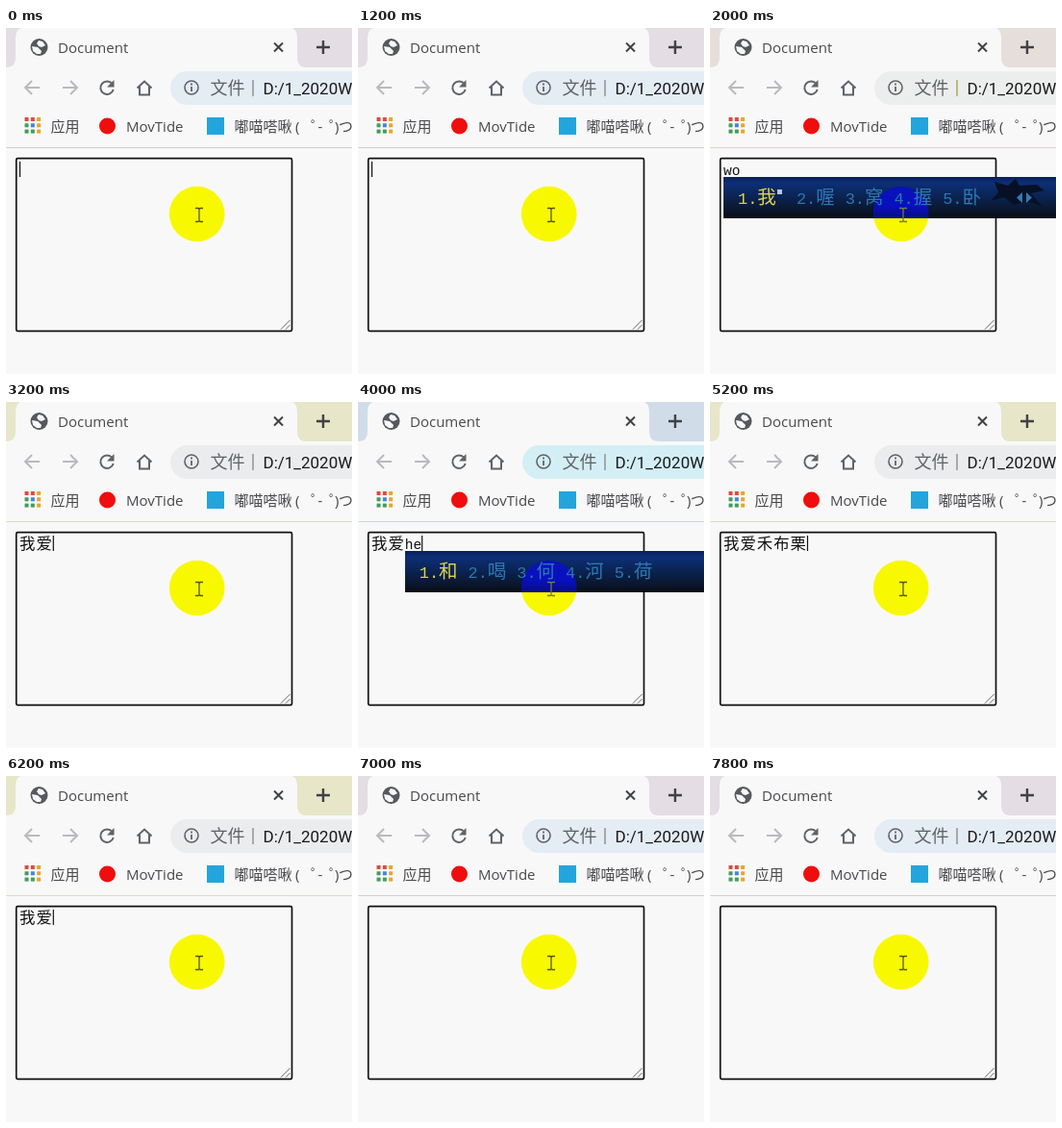
An HTML page for the animation above (8000 ms loop, 360 px wide and 360 px high).

```html
<!DOCTYPE html>
<html lang="zh">
<head>
<meta charset="utf-8">
<title>Document</title>
<style>
  html, body { margin: 0; width: 100%; height: 100%; overflow: hidden; background: #f8f8f8; }
  svg { display: block; width: 100vw; height: 100vh; }
  text { font-family: "Open Sans", "Noto Sans CJK SC", "Noto Sans CJK", sans-serif; font-size: 15px; fill: #48494c; white-space: pre; }
  .line { fill: none; stroke: #5f6368; stroke-width: 2; }
  .han { font-family: "Noto Sans CJK SC", "Noto Sans CJK", sans-serif; font-weight: 300; }
  .mono { font-family: "Liberation Mono", monospace; }
  .address { font-family: Roboto, sans-serif; font-size: 17px; fill: #18191b; }
</style>
</head>
<body>
<svg viewBox="0 0 360 360">
  <defs>
    <linearGradient id="barFill" x2="0" y2="1">
      <stop offset="0" stop-color="#0a1f55"/>
      <stop offset=".14" stop-color="#0c2f78"/>
      <stop offset=".5" stop-color="#0b2350"/>
      <stop offset=".85" stop-color="#0a1428"/>
      <stop offset="1" stop-color="#080c14"/>
    </linearGradient>
    <linearGradient id="glow" gradientUnits="userSpaceOnUse" x1="0" x2="0" y1="165" y2="198">
      <stop offset="0" stop-color="#0a12b8"/>
      <stop offset=".6" stop-color="#0810c0"/>
      <stop offset="1" stop-color="#080c80"/>
    </linearGradient>
    <clipPath id="barClip"><rect id="barClipRect" y="155" width="400" height="43"/></clipPath>
  </defs>
  <rect width="360" height="360" fill="#f8f8f8"/>

  <!-- Tab strip -->
  <rect id="strip" width="360" height="41"/>
  <path d="M0 41Q10 41 10 31V10Q10 -1 21 -1H292Q303 -1 303 10V31Q303 41 313 41Z" fill="#f8f8f8"/>
  <circle cx="34.500" cy="20" r="9" fill="#55585c"/>
  <path d="M27 19l6 1 4 4-1 3-4 0-4-3zM34 13l4 1 3 4-4 2-3-1-2-3z" fill="#f8f8f8"/>
  <text x="54" y="26">Document</text>
  <path class="line" d="M279 15.500l9 9m0-9l-9 9" style="stroke:#3f4144"/>
  <path class="line" d="M330 13v14m-7-7h14" style="stroke:#3f4144;stroke-width:2.4"/>

  <!-- Address row -->
  <path class="line" d="M35 62H20m7-7l-7 7 7 7" style="stroke:#b9babd"/>
  <path class="line" d="M59 62H74m-7-7l7 7-7 7" style="stroke:#b9babd"/>
  <path class="line" d="M110.500 58A6.800 6.800 0 1 0 111.700 64"/>
  <path d="M112.500 54v7.500h-7.500z" fill="#5f6368"/>
  <path class="line" d="M136.500 62.500L144 55.500l7.500 7M139 61v8.500h10V61"/>
  <rect id="pill" x="171" y="45" width="230" height="35" rx="17.500"/>
  <circle class="line" cx="193" cy="62" r="7" style="stroke-width:1.6"/>
  <path class="line" d="M193 61v5m0-8.500v2" style="stroke-width:1.8"/>
  <text x="212.500" y="68.500" style="font-size:18px;fill:#5f6368">文件</text>
  <path id="separator" d="M257 54v17" stroke-width="1.4"/>
  <text class="address" x="267.500" y="68.500">D:/1_2020W</text>

  <!-- Bookmarks -->
  <g id="apps"></g>
  <text x="46.500" y="107.500">应用</text>
  <circle cx="105.500" cy="102" r="8.500" fill="#f00d0d"/>
  <text x="125" y="107.500">MovTide</text>
  <rect x="209" y="93" width="18" height="18" fill="#22a5dc"/>
  <text y="107.500"><tspan x="237.500">嘟喵嗒啾</tspan><tspan x="301">(</tspan><tspan x="317">゜</tspan><tspan x="324.500">-</tspan><tspan x="336">゜</tspan><tspan x="342">)</tspan><tspan x="346">つ</tspan></text>
  <path id="divider" d="M0 124.500H360"/>

  <!-- Text area -->
  <rect x="10.700" y="135.700" width="286.800" height="179.600" rx="1.500" fill="#f8f8f8" stroke="#111" stroke-width="1.700"/>
  <path d="M286 313.500l9.500-9.500m-4.500 9.500l4.500-4.500" stroke="#666"/>
  <circle cx="198.700" cy="193.500" r="28.800" fill="#f8f800"/>
  <text id="typed" x="14" y="152.500" style="fill:#111"></text>
  <path id="caret" stroke="#111" stroke-width="1.200"/>

  <!-- Input method bar -->
  <g id="bar" clip-path="url(#barClip)">
    <rect id="barBody" y="155" width="400" height="43" fill="url(#barFill)"/>
    <circle cx="198.700" cy="193.500" r="28.800" fill="url(#glow)"/>
    <g id="pager">
      <path d="M296 160l14 4 8-7 4 7 18-1 8 6-14 3 12 14-16-6-14 4-10-8-14 4 8-9z" fill="#081026"/>
      <path d="M325 171v11l-6-5.500zM329 171v11l6-5.500z" fill="#2f7cb4"/>
      <rect x="70" y="168" width="5" height="5" fill="#b9c8d4"/>
    </g>
    <text id="choices" y="183"></text>
  </g>
  <path id="beam" d="M197 187.500h3l1 1 1-1h3M197 201.500h3l1-1 1 1h3M201 188v13" fill="none" stroke-width="1.300"/>
</svg>
<script>
const $ = id => document.getElementById(id);
const LOOP = 8000, FULL = 17.4, HALF = 8.7, CELL = 10.15;

const palettes = {
  plain:  { strip: "#e4dde3", pill: "#e4ecf4", line: "#d4ced4" },
  warm:   { strip: "#e7e6c8", pill: "#ebecee", line: "#dddcc0" },
  cool:   { strip: "#d0dde9", pill: "#d3eff5", line: "#cbd6df" },
  first:  { strip: "#e5dedb", pill: "#eceeed", line: "#d8d2ca" }
};

const candidates = {
  "wo": "我 喔 窝 握 卧",
  "a": "啊 阿 吖 呵 锕",
  "ai": "爱 哎 艾 唉 哀",
  "h": "和 好 会 还 很",
  "he": "和 喝 何 河 荷",
  "he'b": "何必 和本 荷包 和 喝",
  "he'bu": "何不 荷布 禾布 和 喝",
  "he'bu'l": "禾布栗 何不 荷布 和 喝",
  "he'bu'li": "禾布栗 何不 荷布 和 喝"
};

// start time, committed text, pinyin being composed, caret shown, palette
const steps = [
  [0, "", "", 1, "plain"], [200, "", "", 0, "plain"], [400, "", "", 1, "plain"],
  [800, "", "", 0, "plain"], [1200, "", "", 1, "plain"], [1400, "", "", 0, "plain"],
  [1600, "", "", 1, "plain"], [2000, "", "wo", 0, "first"],
  [2400, "我", "", 1, "warm"], [2800, "我", "a", 1, "cool"], [3000, "我", "ai", 1, "cool"],
  [3200, "我爱", "", 1, "warm"], [3600, "我爱", "", 0, "warm"], [3800, "我爱", "h", 1, "cool"],
  [4000, "我爱", "he", 1, "cool"], [4400, "我爱", "he'b", 1, "cool"],
  [4600, "我爱", "he'bu", 1, "cool"], [4800, "我爱", "he'bu'l", 1, "cool"],
  [5000, "我爱", "he'bu'li", 1, "cool"], [5200, "我爱禾布栗", "", 1, "warm"],
  [5600, "我爱禾布栗", "", 0, "warm"], [5800, "我爱禾布", "", 1, "warm"],
  [6000, "我爱禾", "", 1, "warm"], [6200, "我爱", "", 1, "warm"], [6400, "我", "", 1, "warm"],
  [6800, "", "", 1, "plain"], [7000, "", "", 0, "plain"], [7200, "", "", 1, "plain"],
  [7600, "", "", 0, "plain"]
];

const span = (x, size, kind, content, extra = "") =>
  `<tspan x="${x}" class="${kind}" style="font-size:${size}px;${extra}">${content}</tspan>`;

function drawBar(x, pinyin) {
  const first = pinyin === "wo";
  $("bar").style.display = pinyin ? "" : "none";
  if (!pinyin) return;
  $("barBody").setAttribute("x", x);
  $("barClipRect").setAttribute("x", x);
  $("pager").style.display = first ? "" : "none";
  let left = x + 15;
  $("choices").innerHTML = candidates[pinyin].split(" ").map((word, i) => {
    const color = `fill:${i ? "#2b78b0" : "#dfd548"}`;
    const item = span(left, 17, "mono", i + 1 + ".", color) +
                 span(left + 2 * CELL, 19.5, "han", word, color);
    left += CELL * (3 + 2 * word.length + (first && !i ? 1 : 0));
    return item;
  }).join("");
}

function draw([, text, pinyin, caret, palette]) {
  const { strip, pill, line } = palettes[palette];
  $("strip").setAttribute("fill", strip);
  $("pill").setAttribute("fill", pill);
  $("divider").setAttribute("stroke", line);
  $("separator").setAttribute("stroke", pinyin === "wo" ? "#a9a34d" : "#8a8d91");
  $("beam").setAttribute("stroke", pinyin ? "#77783f" : "#55551c");

  const start = 14 + FULL * text.length;
  const end = start + HALF * pinyin.length;
  $("typed").innerHTML = span(14, 16.4, "han", text, "letter-spacing:1px") +
                         span(start, 14.5, "mono", pinyin);
  $("caret").setAttribute("d", `M${end + .5} 139v16`);
  $("caret").style.display = caret ? "" : "none";
  drawBar(start, pinyin);
}

const dots = ["#e0483e", "#e0483e", "#e9a52c", "#3f9e55", "#4285d8", "#e9a52c", "#3f9e55", "#3f9e55", "#e9a52c"];
$("apps").innerHTML = dots.map((color, i) =>
  `<rect x="${19.5 + i % 3 * 6.3}" y="${93 + Math.floor(i / 3) * 6.3}" width="4" height="4" fill="${color}"/>`).join("");

let shown;
function tick() {
  const time = performance.now() % LOOP;
  const step = steps.findLast(([start]) => start <= time);
  if (step !== shown) draw(shown = step);
  requestAnimationFrame(tick);
}
tick();
</script>
</body>
</html>
```
